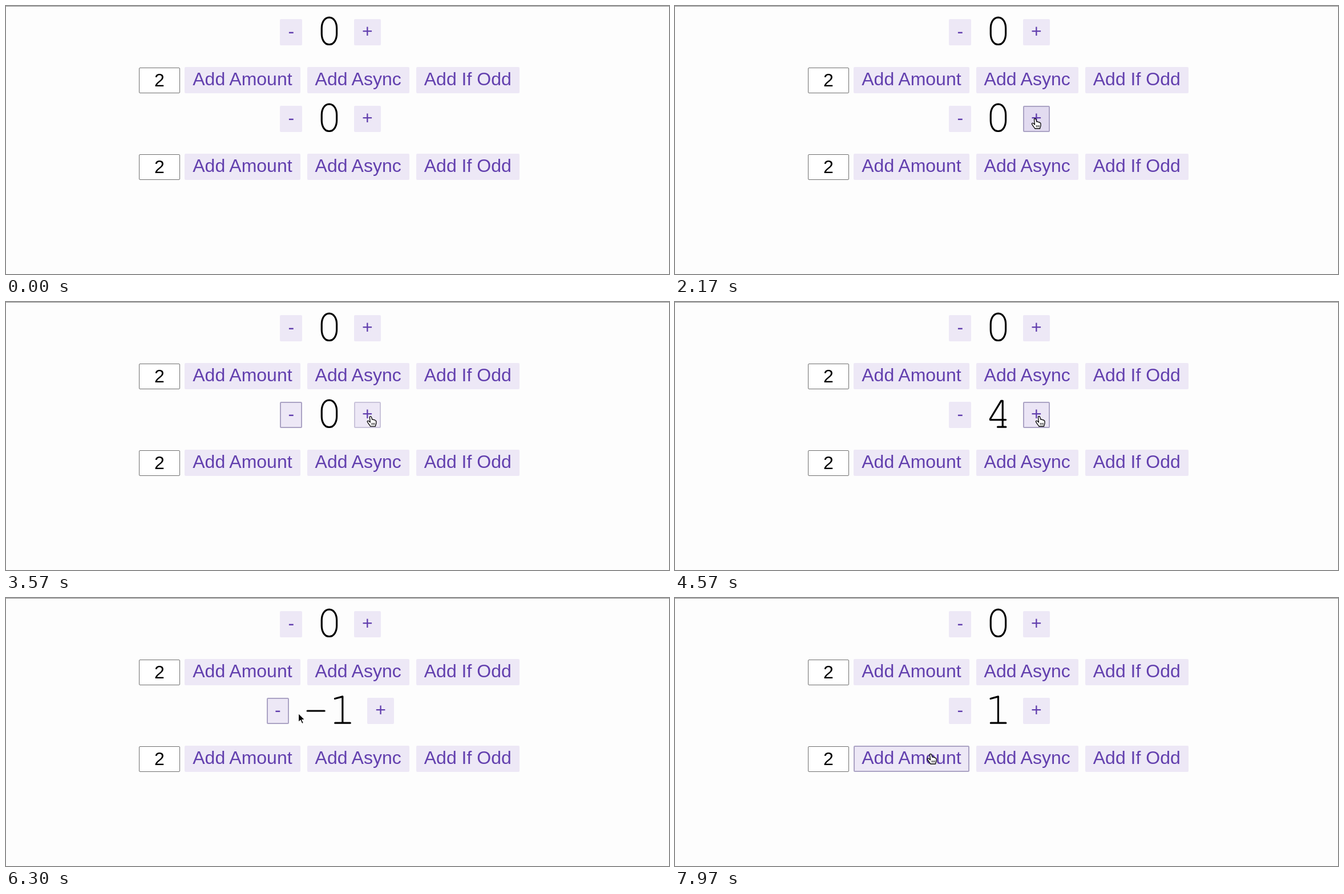
Write an HTML page that moves like this. It is 1162 px wide and 470 px high and loops after 8000 ms.

```html
<!DOCTYPE html>
<html lang="en">
<head>
<meta charset="utf-8">
<title>Counters</title>
<style>
  html, body { margin: 0; width: 100%; height: 100%; overflow: hidden; background: #fdfdfd; }
  svg { display: block; }
  text { font: 32px "Liberation Sans", Arial, sans-serif; fill: #623fae; }
  .amount { fill: #000; text-anchor: middle; }
  .digit { fill: none; stroke: #000; stroke-width: 3.2; stroke-linecap: round; stroke-linejoin: round; }
</style>
</head>
<body>
<svg id="stage" width="1162" height="470" viewBox="0 0 1162 470"></svg>
<script>
const LOOP = 8000, FADE = 150, MID = 570.5, CELL = 46.8;
const FACE = [237, 232, 246], PRESSED = [219, 211, 236];

// Thin slab-style numerals, drawn as strokes in a 46.8 px wide cell.
const GLYPHS = {
  '-': 'M8.5 28H38.5',
  0: 'M23.4 2.1C14.5 2.1 10.2 11.5 10.2 21V30.5C10.2 40 14.5 49.5 23.4 49.5S36.6 40 36.6 30.5V21C36.6 11.5 32.3 2.1 23.4 2.1Z',
  1: 'M10 6.5 23.4 2.9V49.2M10.3 49.2H36.8',
  2: 'M9.5 13.5C10.5 7 16 2.1 22.5 2.1C30 2.1 35.7 7.5 35.7 14.5C35.7 19.5 33 23 28 28L7.8 47.3V49.2H36.4V45.5',
  3: 'M10.5 6C14 3 18 2.1 22.5 2.1C29.5 2.1 34.5 7 34.5 13C34.5 19.5 29 24 21 24H18M21 24C30 24 36.5 29 36.5 36.5C36.5 44 31 49.5 22 49.5C16.5 49.5 12 48 8 44.5',
  4: 'M36.6 36.6H9.4V35L28.6 3.4H31.2V49.2M22.5 49.2H36.8'
};

// Pointer stops: time, x, y. The pointer eases from one to the next.
const STOPS = [
  [120, 45, 370], [1500, 632, 203], [1900, 632, 197], [2500, 632, 197],
  [2780, 505, 202], [3280, 505, 202], [3600, 643, 200], [4000, 639, 200],
  [4720, 639, 200], [5200, 512.5, 202], [6350, 512.5, 202], [6950, 450, 270],
  [7150, 450, 270], [7330, 449, 273], [LOOP, 449, 273]
];

// Clicks: down, up, button, change of the lower counter.
const CLICKS = [
  [2090, 2200, 'inc', 1], [2340, 2430, 'inc', 1],
  [2860, 2950, 'dec', -1], [3090, 3170, 'dec', -1],
  [3720, 3800, 'inc', 1], [3950, 4030, 'inc', 1], [4180, 4260, 'inc', 1], [4370, 4450, 'inc', 1],
  [5340, 5420, 'dec', -1], [5500, 5580, 'dec', -1], [5600, 5780, 'dec', -1],
  [5900, 5980, 'dec', -1], [6080, 6160, 'dec', -1],
  [7350, 7440, 'add', 2]
];

const stage = document.getElementById('stage');

function make(tag, attrs, parent = stage) {
  const el = document.createElementNS('http://www.w3.org/2000/svg', tag);
  set(el, attrs);
  parent.append(el);
  return el;
}

function set(el, attrs) {
  for (const key in attrs) el.setAttribute(key, attrs[key]);
}

function makeButton(label) {
  const g = make('g', {});
  const face = make('rect', { height: 46, rx: 2 }, g);
  const edge = make('rect', { height: 44, rx: 1.5, fill: 'none', stroke: '#aba3c4', 'stroke-width': 2 }, g);
  const text = make('text', {}, g);
  text.textContent = label;
  return { face, edge, text };
}

function makeCounter(top) {
  const buttons = {
    dec: makeButton('-'), inc: makeButton('+'),
    add: makeButton('Add Amount'), async: makeButton('Add Async'), odd: makeButton('Add If Odd')
  };
  make('rect', { x: 233.5, y: top + 90.5, width: 71, height: 44, rx: 1.5, fill: '#fff', stroke: '#6f6f6f' });
  make('text', { x: 269, y: top + 123, class: 'amount' }).textContent = '2';
  const value = make('g', { role: 'img' });
  const digits = [make('path', { class: 'digit' }, value), make('path', { class: 'digit' }, value)];
  return { top, buttons, value, digits };
}

// Left and right edge and top offset of every button for a shown value.
function layout(value) {
  const chars = String(value).length;
  const half = (109.4 + 32 + chars * CELL) / 2;
  const left = MID - half + 4, right = MID + half - 8;
  return {
    dec: [left, left + 38.66, 5], inc: [right - 46.7, right, 5],
    add: [313.25, 515.55, 89], async: [527.55, 706.75, 89], odd: [718.75, 899.75, 89],
    digits: left + 62.66
  };
}

const valueAt = t => CLICKS.reduce((sum, c) => sum + (c[1] <= t ? c[3] : 0), 0);
const heldAt = t => (CLICKS.find(c => c[0] <= t && t < c[1]) || [])[2];
const focusAt = t => (CLICKS.filter(c => c[0] <= t).pop() || [])[2];

function pointerAt(t) {
  if (t < STOPS[0][0]) return null;
  const i = Math.max(1, STOPS.findIndex(s => s[0] > t));
  const [t0, x0, y0] = STOPS[i - 1], [t1, x1, y1] = STOPS[i];
  const u = (t - t0) / (t1 - t0);
  const k = i === 1 ? u * (2 - u) : u * u * (3 - 2 * u);
  return [x0 + (x1 - x0) * k, y0 + (y1 - y0) * k];
}

function hoverAt(t) {
  const p = pointerAt(t);
  if (!p) return undefined;
  const boxes = layout(valueAt(t));
  return ['dec', 'inc', 'add', 'async', 'odd'].find(id => {
    const [l, r, dy] = boxes[id], y = lower.top + dy;
    return p[0] >= l && p[0] < r && p[1] >= y && p[1] < y + 46;
  });
}

// Linear fade: the share of the last 150 ms in which a state was on.
function fade(t, on) {
  let n = 0;
  for (let k = 0; k < 15; k++) n += on(Math.max(0, t - k * FADE / 15)) ? 1 : 0;
  return n / 15;
}

function drawCounter(c, value, lit, held) {
  const boxes = layout(value);
  for (const id in c.buttons) {
    const b = c.buttons[id], [l, r, dy] = boxes[id];
    const x = Math.round(l), w = Math.round(r) - x, y = c.top + dy, h = held(id);
    const rgb = FACE.map((v, i) => Math.round(v + (PRESSED[i] - v) * h));
    set(b.face, { x, y, width: w, fill: `rgb(${rgb})` });
    set(b.edge, { x: x + 1, y: y + 1, width: w - 2, opacity: lit(id) });
    set(b.text, { x: l + 14, y: y + 32 });
  }
  const chars = String(value);
  c.value.setAttribute('aria-label', chars);
  c.digits.forEach((el, i) => set(el, {
    d: GLYPHS[chars[i]] || '',
    transform: `translate(${boxes.digits + i * CELL} ${c.top})`
  }));
}

make('rect', { width: 1162, height: 470, fill: '#fdfdfd' });
make('rect', { width: 1162, height: 1, fill: '#8c8c8c' });
const upper = makeCounter(18), lower = makeCounter(170);
const ink = { fill: '#fff', stroke: '#000', 'stroke-width': 1.3, 'stroke-linejoin': 'round' };
const arrow = make('path', { ...ink, fill: '#000', stroke: '#fff', d: 'M0 0V16L3.7 12.6 6.2 18.5 8.9 17.3 6.4 11.6H11.4Z' });
const hand = make('g', {});
make('path', {
  ...ink,
  d: 'M-2.5 1.6C-2.3 .2.1.1.6 1.6L2 6.2C3 5.4 4.4 5.7 4.8 6.8C5.9 6.3 7 6.7 7.3 7.8C8.3 7.6 9 8.4 9 9.5V12.5C9 14.5 7.8 15.5 7.6 18H-1.2C-1.6 16.5-3.2 15.4-4.4 13.4L-6.5 10.2C-7.1 8.8-5.3 7.7-4 8.8L-1.5 11Z'
}, hand);
make('path', { ...ink, fill: 'none', 'stroke-width': 1, d: 'M1.4 12V15.5M3.8 12V15.5M6.1 12V15.5' }, hand);

drawCounter(upper, 0, () => 0, () => 0);

function draw(t) {
  drawCounter(lower, valueAt(t),
    id => fade(t, s => focusAt(s) === id || hoverAt(s) === id),
    id => fade(t, s => heldAt(s) === id));
  const p = pointerAt(t), over = hoverAt(t);
  const at = p ? `translate(${p[0]} ${p[1]})` : '';
  set(arrow, { transform: at, visibility: p && !over ? 'visible' : 'hidden' });
  set(hand, { transform: at, visibility: p && over ? 'visible' : 'hidden' });
}

const start = performance.now();
function tick() {
  draw((performance.now() - start) % LOOP);
  requestAnimationFrame(tick);
}
tick();
</script>
</body>
</html>
```
